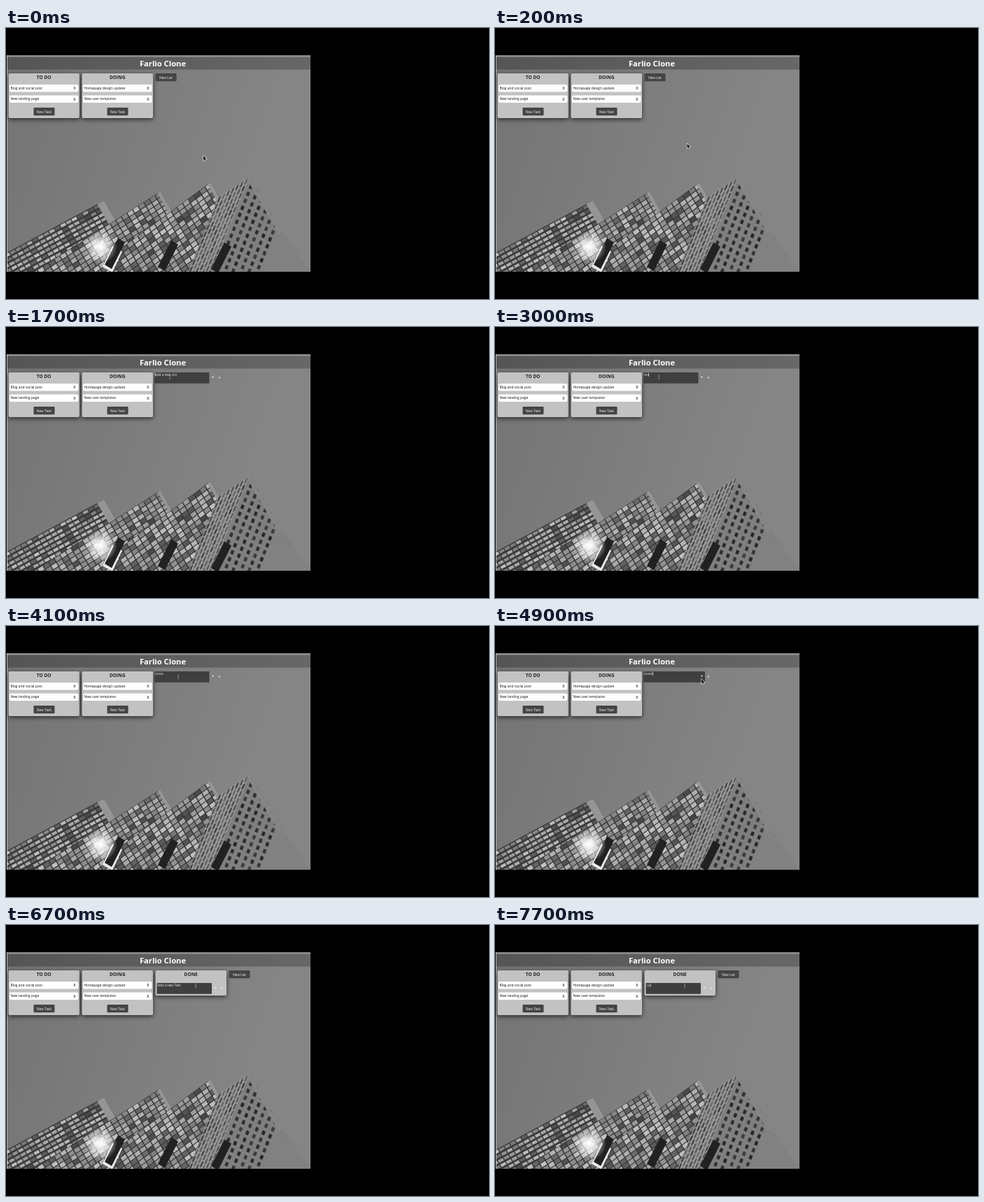
Animation of 690 by 388 pixels, one loop 8 s. Source, as an HTML page with a canvas:

```html
<!DOCTYPE html>
<html lang="en">
<head>
<meta charset="utf-8">
<title>Task board</title>
<style>
  html, body { margin: 0; height: 100%; overflow: hidden; background: #000; }
  canvas { display: block; }
</style>
</head>
<body>
<canvas id="stage" width="690" height="388"></canvas>
<script>
const LOOP = 8000;
const STEP = 100;
const BLINK = 530;
const KEY_GAP = 200;
const SANS = '"Open Sans", "Noto Sans", sans-serif';
const ARIAL = '"Liberation Sans", sans-serif';
const stage = document.getElementById('stage').getContext('2d');
let ctx = stage;

function box(x, y, w, h, fill, radius = 0) {
  ctx.fillStyle = fill;
  ctx.beginPath();
  ctx.roundRect(x, y, w, h, radius);
  ctx.fill();
}

function trace(...points) {
  ctx.beginPath();
  points.forEach(([x, y]) => ctx.lineTo(x, y));
  ctx.closePath();
}

function label(text, x, y, font, fill, align = 'left') {
  ctx.font = font;
  ctx.fillStyle = fill;
  ctx.textAlign = align;
  ctx.fillText(text, x, y);
}

let seed = 7;
function random() {
  seed = (seed * 16807) % 2147483647;
  return seed / 2147483647;
}

function grey(level, spread = 0) {
  const v = Math.round(level + spread * random());
  return `rgb(${v},${v - 1},${v})`;
}

// Runs paint in a slanted space where u and v are the unit steps.
function slanted([x, y], u, v, paint) {
  ctx.save();
  ctx.transform(...u, ...v, x, y);
  paint();
  ctx.restore();
}

function facade(apex, u, v, columns, rows, wall, pane, width, height) {
  slanted(apex, u, v, () => {
    box(0, 0, columns, rows, wall);
    for (let i = 0; i < columns; i++) {
      for (let j = 0; j < rows; j++) {
        box(i + (1 - width) / 2, j + (1 - height) / 2, width, height, pane());
      }
    }
  });
}

function paintSawtooth(k) {
  const apex = [140 + k * (85 - 4.5 * k), 247 - 13 * k];
  const u = [-8, 4.3 + 0.8 * k];
  const v = [3.4, 5.9];
  const pane = () => random() < 0.2 ? grey(70, 40) : grey(120, 75);
  facade(apex, u, v, 26, 22, grey(58), pane, 0.84, k ? 0.82 : 0.6);
  slanted(apex, u, v, () => box(0, 0, k ? 0.5 : 1.2, 22, grey(150)));
}

function paintCornerTower() {
  const apex = [348, 213];
  const down = [-4, 10];
  facade(apex, [-6.4, 4.2], down, 7, 14, grey(152), () => grey(55, 55), 0.5, 0.78);
  ctx.save();
  trace(apex, [393, 290], [435, 349], [294, 349]);
  ctx.clip();
  box(290, 210, 145, 140, grey(128));
  facade([340, 180], [9.5, 5], down, 11, 17, grey(128), () => grey(38, 25), 0.42, 0.55);
  slanted(apex, [45, 77], down, () => box(0.9, -20, 5, 40, grey(130)));
  slanted(apex, [45, 77], down, () => box(0, 0, 1, 0.6, grey(135)));
  ctx.restore();
}

function paintSun(x, y, radius) {
  const light = ctx.createRadialGradient(x, y, 0, x, y, radius);
  light.addColorStop(0, '#fff');
  light.addColorStop(0.3, 'rgba(255,255,255,.8)');
  light.addColorStop(1, 'rgba(255,255,255,0)');
  box(x - radius, y - radius, 2 * radius, 2 * radius, light);
  for (let ray = 0; ray < 4; ray++) {
    ctx.save();
    ctx.translate(x, y);
    ctx.rotate(ray * Math.PI / 4 + 0.3);
    box(-17, -0.4, 34, 0.8, 'rgba(255,255,255,.7)');
    ctx.restore();
  }
}

function paintBackdrop() {
  ctx.save();
  trace([1, 39], [435, 39], [435, 349], [1, 349]);
  ctx.clip();
  const sky = ctx.createLinearGradient(1, 80, 350, 200);
  sky.addColorStop(0, grey(117));
  sky.addColorStop(1, grey(134));
  box(1, 39, 434, 310, sky);

  for (let k = 0; k < 3; k++) paintSawtooth(k);
  paintCornerTower();
  slanted([152, 312], [14, 8], [-14, 30], () => box(0, 0, 1, 1, grey(235)));
  for (let k = 0; k < 3; k++) {
    slanted([160 + 76 * k, 301 + 3 * k], [10, 6], [-19, 38], () => box(0, 0, 1, 1, grey(34)));
  }
  paintSun(135, 313, 24);

  const bar = ctx.createLinearGradient(1, 0, 435, 0);
  bar.addColorStop(0, grey(86));
  bar.addColorStop(1, grey(104));
  box(1, 41, 434, 18.5, bar);
  box(1, 39, 434, 2.5, grey(145));
  box(1, 39, 1, 310, grey(190));
  ctx.restore();
  label('Farlio Clone', 224, 55.2, `bold 11.2px ${SANS}`, '#fff', 'center');
}

function button(text, x, y) {
  box(x, y, 30, 11.3, '#454445', 1);
  label(text, x + 15, y + 7.5, `4.8px ${ARIAL}`, '#eee', 'center');
}

function card(title, x, height) {
  ctx.shadowColor = 'rgba(0,0,0,.65)';
  ctx.shadowBlur = 6;
  ctx.shadowOffsetY = 2;
  box(x, 65, 101.5, height, '#c3c2c3', 2);
  ctx.shadowColor = 'transparent';
  label(title, x + 50.7, 73.2, `bold 6.6px ${SANS}`, '#222', 'center');
}

function taskList(title, x, tasks) {
  card(title, x, 64);
  tasks.forEach((task, i) => {
    const y = 81 + i * 15.4;
    box(x + 1.5, y, 98.5, 10.6, '#fff', 2);
    label(task, x + 3, y + 7, `4.9px ${SANS}`, '#111');
    label('x', x + 94.5, y + 7.2, `6.4px ${SANS}`, '#111', 'center');
  });
  button('New Task', x + 36, 114);
}

// A text field opened at one time and typed into, at an even pace, from another.
function entry(t, field) {
  const { x, y, opened, typing, text, placeholder, hover } = field;
  const keys = Math.min(text.length, Math.max(0, Math.floor((t - typing) / KEY_GAP) + 1));
  const typed = text.slice(0, keys);
  const lastKey = keys ? typing + (keys - 1) * KEY_GAP : opened;
  box(x, y, hover ? 88 : 78.5, 15.8, '#403f40', 1);
  label(typed || placeholder, x + 0.7, y + 5, `${keys ? 4.3 : 4.7}px ${SANS}`, '#eee');
  if (Math.floor((t - lastKey) / BLINK) % 2 === 0) {
    const width = keys ? ctx.measureText(typed).width : 0;
    box(x + 0.8 + width, y + 0.8, 0.7, 5, '#fff');
  }
  label('+', x + 83.5, y + 9, `bold 6px ${SANS}`, '#fff', 'center');
  label('x', x + 92.7, y + 9, `6px ${SANS}`, '#fff', 'center');
}

function arrow(x, y) {
  ctx.save();
  ctx.translate(x, y);
  trace([0, 0], [0, 6.2], [1.4, 5], [2.5, 7.2], [3.5, 6.7], [2.5, 4.6], [4.4, 4.5]);
  ctx.lineWidth = 1.1;
  ctx.strokeStyle = '#eee';
  ctx.stroke();
  ctx.fillStyle = '#111';
  ctx.fill();
  ctx.restore();
}

function beam(x, y) {
  box(x - 0.3, y - 2.5, 0.7, 5, '#aaa');
  for (const end of [-2.7, 2.2]) box(x - 1, y + end, 2, 0.5, '#aaa');
}

function glide(t, start, end) {
  const p = Math.min(1, Math.max(0, (t - start) / (end - start)));
  return p * p * (3 - 2 * p);
}

function pointer(t) {
  const toNewList = glide(t, 0, 800);
  const toPlus = glide(t, 3900, 4600);
  const toNewTask = glide(t, 5200, 5700);
  return [
    282 - 48 * toNewList + 61 * toPlus - 24 * toNewTask,
    183 - 111 * toNewList + 4 * toPlus + 11 * toNewTask,
  ];
}

const listField = {
  x: 212, y: 65, opened: 1300, closed: 5000, typing: 2800,
  text: 'DONE', placeholder: 'Add a new List',
};
const taskField = {
  x: 215.5, y: 83, opened: 6100, typing: 7500,
  text: 'Ch', placeholder: 'Add a new Task',
};

const backdrop = document.createElement('canvas');
backdrop.width = 690;
backdrop.height = 388;
ctx = backdrop.getContext('2d');
paintBackdrop();
ctx = stage;

function draw(t) {
  ctx.clearRect(0, 0, 690, 388);
  ctx.drawImage(backdrop, 0, 0);
  taskList('TO DO', 3.5, ['Blog and social post', 'New landing page']);
  taskList('DOING', 108.5, ['Homepage design update', 'New user templates']);

  const [x, y] = pointer(t);
  const naming = t >= listField.opened && t < listField.closed;
  const adding = t >= taskField.opened;
  const onPlus = x > 290;
  if (naming) {
    entry(t, { ...listField, hover: onPlus });
  } else if (t < listField.opened) {
    button('New List', 213.5, 65);
  } else {
    card('DONE', 213.5, adding ? 36 : 33);
    button('New List', 318.5, 65);
    if (adding) entry(t, taskField);
    else button('New Task', 249.5, 83);
  }

  const overText = adding || (naming && !onPlus);
  (overText ? beam : arrow)(x, y);
}

function frame() {
  const t = performance.now() % LOOP;
  draw(t - t % STEP);
  requestAnimationFrame(frame);
}
frame();
</script>
</body>
</html>
```
